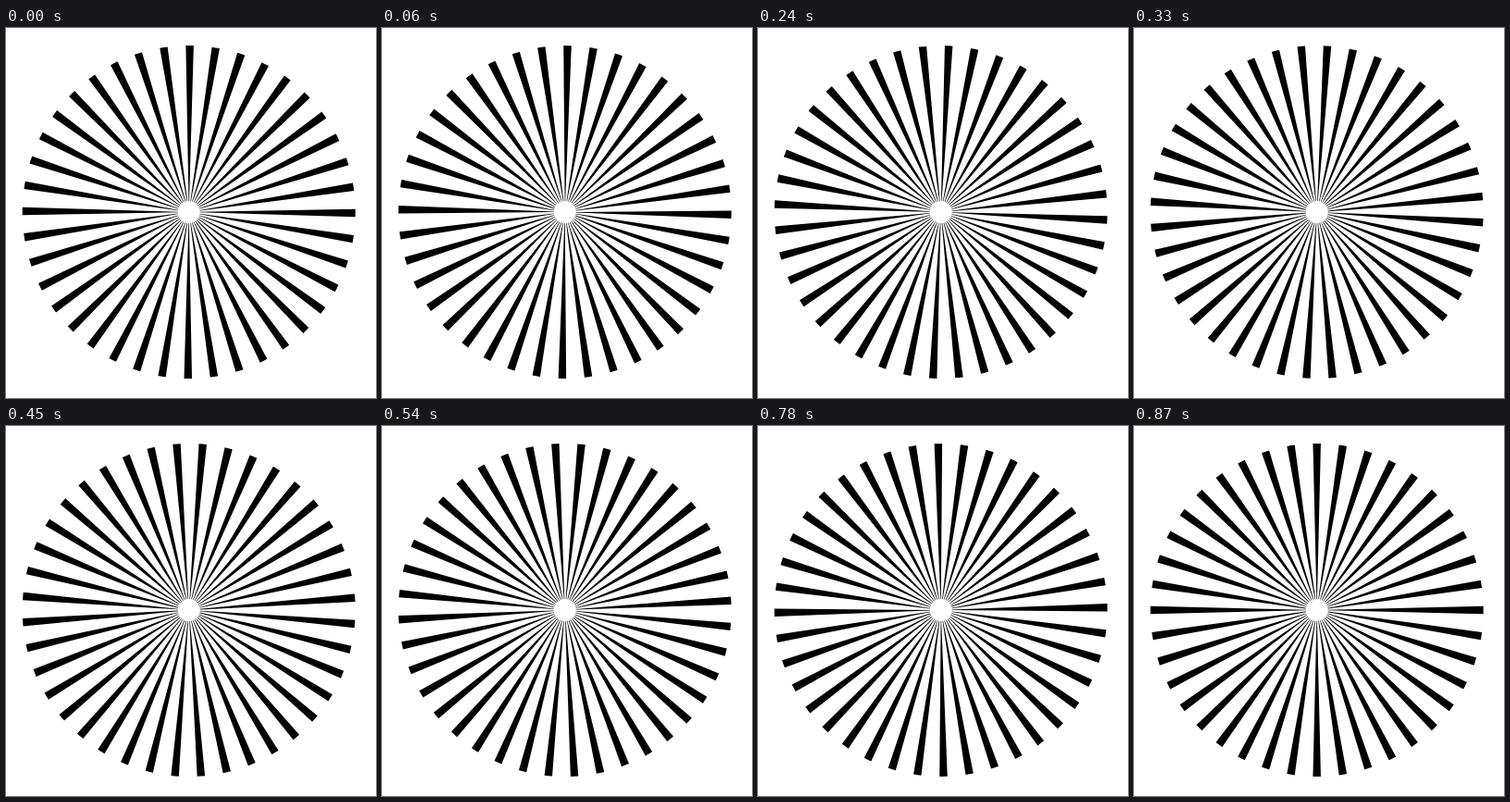
These frames come from a looping animation (400 by 400 pixels, 0.9 s). An HTML page with a canvas:

```html
<!DOCTYPE html>
<html lang="en">
<head>
<meta charset="utf-8">
<title>Rotating rays</title>
<style>
  html, body { margin: 0; width: 100%; height: 100%; overflow: hidden; background: #fff; }
  canvas { display: block; width: 400px; height: 400px; }
</style>
</head>
<body>
<canvas id="stage" width="400" height="400"></canvas>
<script>
const ctx = document.getElementById('stage').getContext('2d');
const RAYS = 40;
const STEPS = 30;
const STEP_MS = 30;
const CENTER = { x: 197.7, y: 199 };
const OUTER = 180;
const INNER = 12;
const PITCH = 2 * Math.PI / RAYS;
const HALF_WIDTH = PITCH * 0.15;

function draw(rotation) {
  ctx.fillStyle = '#fff';
  ctx.fillRect(0, 0, 400, 400);
  ctx.fillStyle = '#000';
  ctx.beginPath();
  for (let i = 0; i < RAYS; i++) {
    const angle = rotation + i * PITCH;
    const from = angle - HALF_WIDTH;
    const to = angle + HALF_WIDTH;
    ctx.moveTo(CENTER.x + INNER * Math.cos(from), CENTER.y + INNER * Math.sin(from));
    ctx.arc(CENTER.x, CENTER.y, OUTER, from, to);
    ctx.arc(CENTER.x, CENTER.y, INNER, to, from, true);
    ctx.closePath();
  }
  ctx.fill();
}

// One loop turns the wheel by exactly one ray, in discrete steps.
function tick(now) {
  const step = Math.floor(now / STEP_MS) % STEPS;
  draw((step + 1) / STEPS * PITCH);
  requestAnimationFrame(tick);
}

draw(PITCH / STEPS);
requestAnimationFrame(tick);
</script>
</body>
</html>
```
